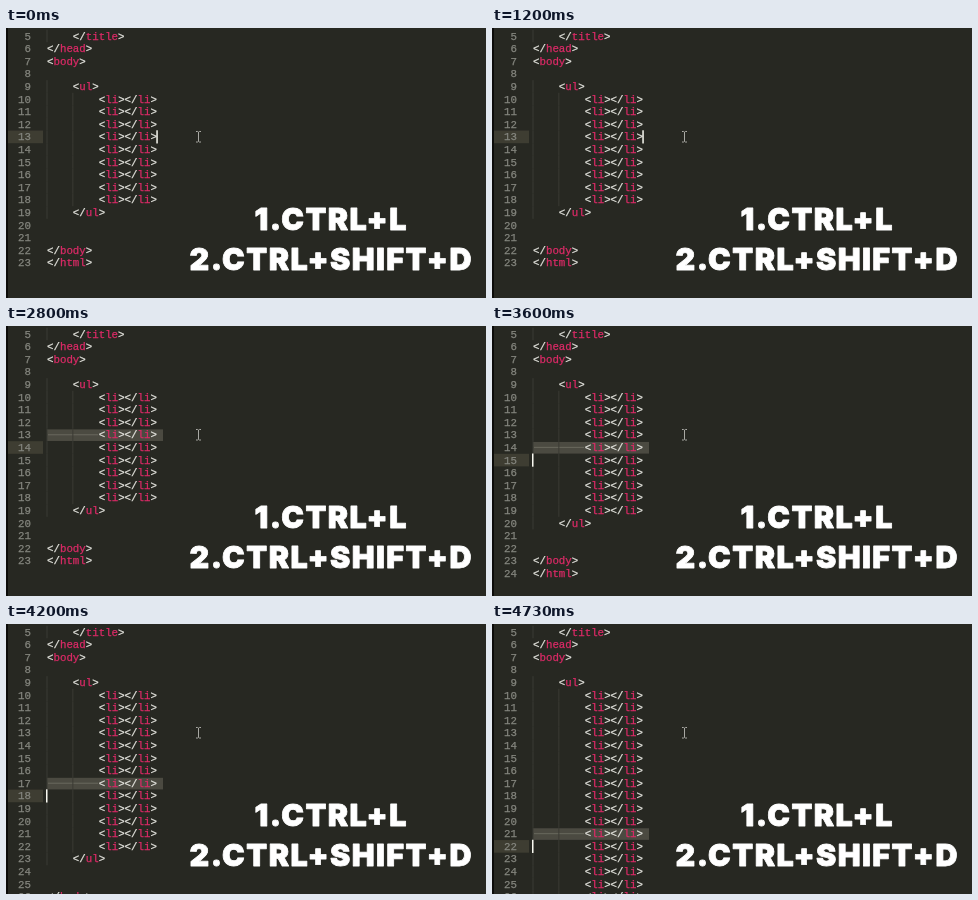
These frames come from a looping animation (480 px wide and 270 px high, 4870 ms). An HTML page:

```html
<!DOCTYPE html>
<html lang="en">
<head>
<meta charset="utf-8">
<title>Duplicate line shortcut</title>
<style>
  html, body { margin: 0; width: 100%; height: 100%; overflow: hidden; background: #272822; }
  svg { display: block; width: 480px; height: 270px; }
  text { white-space: pre; }
  .code { font: 10.78px "Liberation Mono", "Noto Sans Mono", monospace; fill: #e6e6e0; stroke: #e6e6e0; stroke-width: .25; }
  .tag { fill: #dc2a67; stroke: #dc2a67; }
  .num { fill: #85867f; stroke: #85867f; text-anchor: end; }
  .guide { stroke: #3a3b34; stroke-width: 1; }
  .caption {
    font: 900 30.5px Inter, "Open Sans", sans-serif; letter-spacing: 1.4px;
    fill: #fff; stroke: #fff; stroke-width: .8; stroke-linejoin: round; text-anchor: middle;
  }
</style>
</head>
<body>
<svg viewBox="0 0 480 270">
  <rect width="480" height="270" fill="#272822"/>
  <rect id="active" x="2" width="35" height="12.6" fill="#3e3d32"/>
  <g id="selection">
    <rect x="41" y=".8" width="116" height="11.6" fill="#4b4a41"/>
    <path d="M42 6.2H92" stroke="#6c6b60" stroke-width=".9"/>
  </g>
  <g id="guides" class="guide"></g>
  <g id="lines" class="code"></g>
  <rect id="caret" width="1.5" height="13.2" fill="#f8f8f0"/>
  <rect width="2" height="270" fill="#0c0c0a"/>
  <path d="M190 103.5h1.6l.9.7.9-.7h1.6M192.5 104v9.5M190 114h1.6l.9-.7.9.7h1.6" fill="none" stroke="#a9a9a4"/>
  <g class="caption">
    <text x="325.2" y="202">1.CTRL+L</text>
    <text x="325.2" y="242">2.CTRL+SHIFT+D</text>
  </g>
</svg>
<script>
const LOOP = 4870, PITCH = 12.61, CHAR = 6.468, LEFT = 41, FIRST = 5;
const SELECT_AT = 1330;
const COPIES_AT = [3600, 3870, 4070, 4200, 4330, 4470, 4600, 4730];
// [time, opacity] pairs, linear in between
const BLINK = [
  [0, 1], [250, 1], [400, 0], [950, 0], [1130, 1], [1580, 1], [1730, 0], [2230, 0],
  [2400, 1], [2650, 1], [2800, 0], [3300, 0], [3470, 1], [LOOP, 1]
];

const el = id => document.getElementById(id);
const lineTop = line => 1.7 + (line - FIRST) * PITCH;
const column = n => LEFT + n * CHAR;
const moveTo = (id, x, y) => el(id).setAttribute("transform", `translate(${x} ${y})`);

function markup(code) {
  return code.replace(/<(\/?)(\w+)>/g, '&lt;$1<tspan class="tag">$2</tspan>&gt;');
}

function documentLines(copies) {
  const items = Array(9 + copies).fill([8, "<li></li>"]);
  return [[4, "</title>"], [0, "</head>"], [0, "<body>"], [0, ""], [4, "<ul>"],
    ...items, [4, "</ul>"], [0, ""], [0, ""], [0, "</body>"], [0, "</html>"]];
}

function drawLines(copies) {
  let text = "", guides = "";
  documentLines(copies).forEach(([indent, code], i) => {
    const line = FIRST + i, y = lineTop(line), base = y + 9.8;
    if (y > 270) return;
    text += `<text class="num" x="25" y="${base}">${line}</text>`;
    text += `<text x="${column(indent)}" y="${base}">${markup(code)}</text>`;
    for (let c = 0; c < indent; c += 4)
      guides += `<path d="M${column(c)} ${y}v${PITCH}"/>`;
  });
  el("lines").innerHTML = text;
  el("guides").innerHTML = guides;
}

function caretOpacity(t) {
  const i = BLINK.findIndex(step => step[0] > t);
  const [t0, a] = BLINK[i - 1], [t1, b] = BLINK[i];
  return a + (b - a) * (t - t0) / (t1 - t0);
}

let shown = -1;
function frame() {
  const t = performance.now() % LOOP;
  const copies = COPIES_AT.filter(at => t >= at).length;
  const selected = t >= SELECT_AT;
  if (copies !== shown) drawLines(shown = copies);

  const line = 13 + copies, current = line + selected;
  moveTo("active", 0, lineTop(current));
  moveTo("selection", 0, lineTop(line));
  el("selection").style.display = selected ? "" : "none";
  moveTo("caret", selected ? 40 : 150.3, lineTop(current) - .3);
  el("caret").style.opacity = caretOpacity(t);
  requestAnimationFrame(frame);
}
frame();
</script>
</body>
</html>
```
